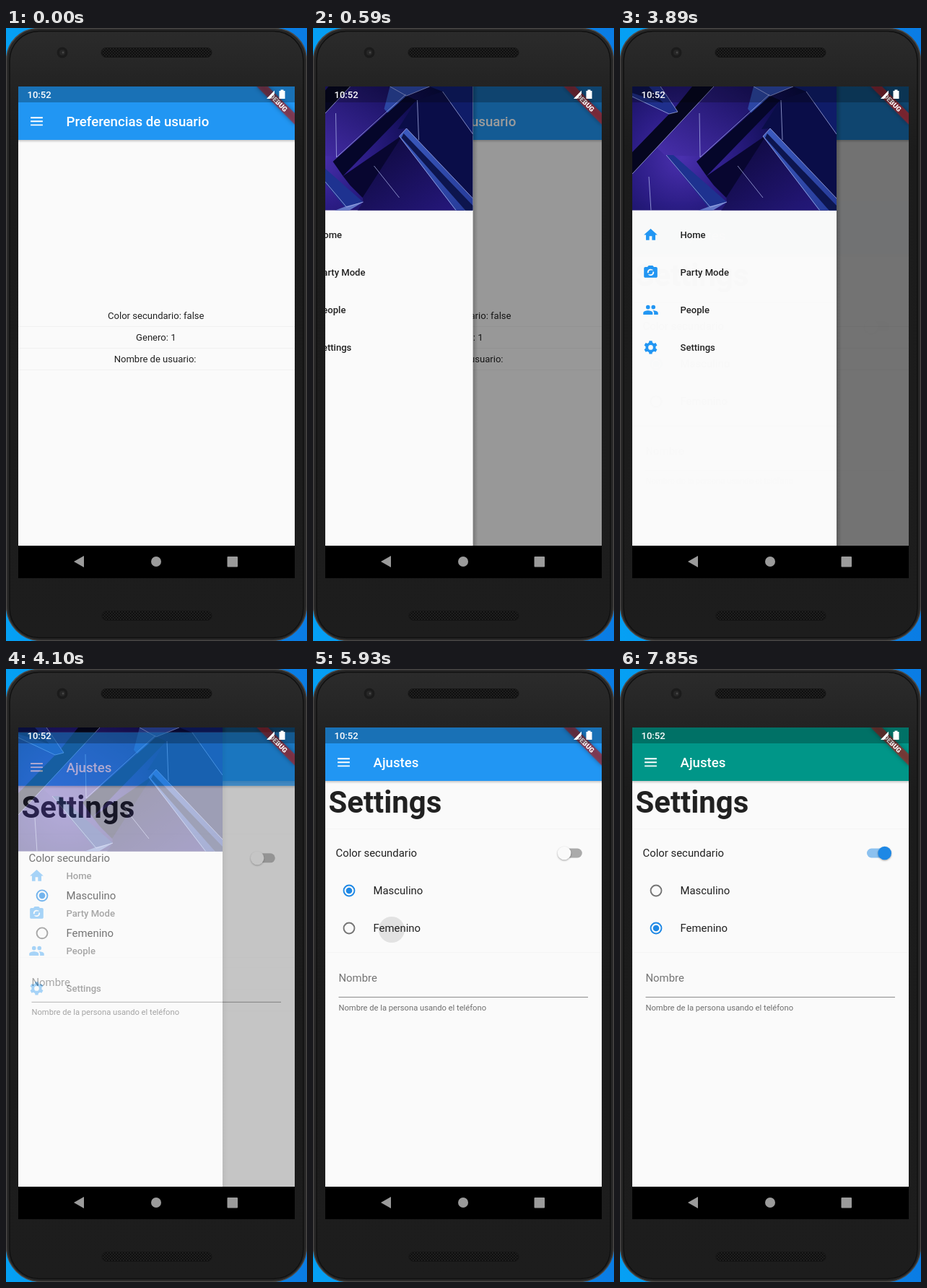
Animation, 417 px wide and 849 px high, one loop 8 s. Source, as an HTML page:

```html
<!DOCTYPE html>
<html lang="es">
<head>
<meta charset="utf-8">
<title>Preferencias de usuario</title>
<style>
  html, body { margin: 0; width: 100%; height: 100%; overflow: hidden; background: #0a86e8; }
  svg { display: block; }
  text { font-family: Roboto, "Noto Sans", sans-serif; font-size: 13.05px; fill: #212121; }
  .bar { font-size: 18.64px; font-weight: 500; fill: #fff; }
  .tile { font-weight: 500; }
  .big { font-size: 41.9px; font-weight: 700; }
  .row { font-size: 14.9px; }
  .help { font-size: 11.18px; fill: #6f6f6f; }
  .mid { text-anchor: middle; }
  .line { stroke: #000; stroke-opacity: .04; }
  #thumb { filter: drop-shadow(0 1px 1px rgba(0, 0, 0, .35)); }
  #ribbon { filter: drop-shadow(0 0 3px rgba(0, 0, 0, .5)); }
</style>
</head>
<body>
<svg width="417" height="849" viewBox="0 0 417 849">
  <defs>
    <linearGradient id="desk"><stop stop-color="#05a0f4"/><stop offset="1" stop-color="#0a7ce4"/></linearGradient>
    <linearGradient id="body" x2="0" y2="1">
      <stop stop-color="#2b2b2b"/><stop offset=".1" stop-color="#222"/>
      <stop offset=".2" stop-color="#1b1b1b"/><stop offset="1" stop-color="#1d1d1d"/>
    </linearGradient>
    <linearGradient id="fall" x2="0" y2="1"><stop stop-opacity=".2"/><stop offset="1" stop-opacity="0"/></linearGradient>
    <linearGradient id="side"><stop stop-opacity=".22"/><stop offset="1" stop-opacity="0"/></linearGradient>
    <radialGradient id="art" gradientUnits="userSpaceOnUse" cx="85" cy="180" r="190">
      <stop stop-color="#4a30ae"/><stop offset=".35" stop-color="#2c1d86"/>
      <stop offset=".7" stop-color="#130f58"/><stop offset="1" stop-color="#070a3c"/>
    </radialGradient>
    <linearGradient id="beam" x2="1" y2="1"><stop stop-color="#3c5cc0"/><stop offset="1" stop-color="#263a98"/></linearGradient>
    <linearGradient id="slab" x1="1" x2="0" y2="1"><stop stop-color="#150f5c"/><stop offset="1" stop-color="#4a30ae"/></linearGradient>
    <linearGradient id="floor" x2="1" y2="1"><stop stop-color="#0c0838"/><stop offset="1" stop-color="#26187e"/></linearGradient>
    <pattern id="mesh" width="4" height="4" patternUnits="userSpaceOnUse">
      <rect width="4" height="4" fill="#101010"/><path d="M0 0h1.400v1.400h-1.400zM2 2h1.400v1.400h-1.400z" fill="#2a2a2a"/>
    </pattern>
    <path id="menu" d="M34.1 124.200h16.800M34.1 129.300h16.800M34.1 134.400h16.800" stroke="#fff" stroke-width="1.900"/>
  </defs>

  <!-- phone -->
  <rect width="417" height="849" fill="url(#desk)"/>
  <path d="M.5 44A44 44 0 0 1 44 .5H373A44 44 0 0 1 416.500 44V800A48 48 0 0 1 368 848.500H49A48 48 0 0 1 .5 800Z"
    fill="#262626" stroke="#4c4a48" stroke-width="1.500"/>
  <rect x="5" y="4.500" width="407" height="840" rx="41" fill="url(#body)" stroke="#101010" stroke-width="1.500"/>
  <circle cx="78" cy="34" r="7.500" fill="#1b1b1b"/>
  <circle cx="78" cy="34" r="4" fill="#272727"/><circle cx="79" cy="34" r="1.400" fill="#484848"/>
  <rect x="132" y="27.500" width="153" height="13" rx="6.500" fill="url(#mesh)" stroke="#151515"/>
  <rect x="133" y="807.500" width="152" height="13" rx="6.500" fill="url(#mesh)" stroke="#151515"/>

  <!-- app -->
  <svg x="17" y="81" width="383" height="636" viewBox="17 81 383 636">
    <rect x="17" y="81" width="383" height="636" fill="#fafafa"/>
    <rect x="17" y="155" width="383" height="4" fill="url(#fall)"/>
    <rect x="17" y="81" width="383" height="74" fill="#2196f3"/>
    <use href="#menu"/>
    <text class="bar" x="83.500" y="136">Preferencias de usuario</text>
    <text class="mid" x="207.800" y="403">Color secundario: false</text>
    <text class="mid" x="207.800" y="433">Genero: 1</text>
    <text class="mid" x="206.600" y="463">Nombre de usuario:</text>
    <path class="line" d="M17 413.500h383M17 443.500h383M17 473.500h383"/>
    <rect id="scrim" x="17" y="81" width="383" height="636"/>

    <g id="drawer">
      <rect x="300" y="81" width="7" height="636" fill="url(#side)"/>
      <rect x="17" y="81" width="283" height="636" fill="#fafafa"/>
      <svg x="17" y="81" width="283" height="171.500" viewBox="17 81 283 171.500">
        <rect x="17" y="81" width="283" height="172" fill="url(#art)"/>
        <path d="M62 176L112 178L203 92L182 81H130L75 120L40 155Z" fill="url(#slab)"/>
        <path d="M100 81H130L17 202V172L75 112Z" fill="#05061f"/>
        <path d="M17 81H56L80 116L68 119L17 96Z" fill="#1f2f8c"/>
        <path d="M17 81H40L60 104L17 90Z" fill="#0c1250"/>
        <path d="M185 81H240L208 94L183 119L177 112Z" fill="#2c46a4"/>
        <path d="M208 94L222 100L120 205L106 185Z" fill="#05062a"/>
        <path d="M240 81H300V150L258 88Z" fill="#0f1c68"/>
        <path d="M222 100L258 88L300 147V236L208 139L196 140Z" fill="#0a0d48"/>
        <path d="M203 150L145 215L148 241L140 253H288Z" fill="url(#floor)"/>
        <path d="M203 148L147 235L130 218L120 205Z" fill="#080630"/>
        <path d="M198 150L208 139L300 236V253H276Z" fill="url(#beam)"/>
        <path d="M204 146L300 246V253H290L201 152Z" fill="#0d154e"/>
        <path d="M64 176L74 176L148 241L124 250Z" fill="#1e3290"/>
        <path d="M108 253L124 247L148 241L128 253Z" fill="#6478c8"/>
        <g fill="none" stroke="#b4bdf0" stroke-width=".9" opacity=".8">
          <path d="M17 95L68 119L80 116L56 81M130 81L17 202M207 92L111 179L110 118"/>
          <path d="M185 81L208 94L240 81M223 100L225 155M258 88L300 147M64 176L125 248L148 241"/>
          <path d="M40 206L43 253M163 191L198 235M198 150L208 139L300 236M198 150L277 253"/>
        </g>
      </svg>
      <g id="tiles" fill="#2196f3"></g>
    </g>

    <g id="page">
      <rect x="17" y="81" width="383" height="636" fill="#fafafa"/>
      <rect x="17" y="155" width="383" height="4" fill="url(#fall)"/>
      <rect id="appbar" x="17" y="81" width="383" height="74"/>
      <use href="#menu"/>
      <text class="bar" x="83.500" y="136">Ajustes</text>
      <text class="big" x="21.500" y="199">Settings</text>
      <path class="line" d="M17 221.500h383M17 392.500h383" opacity=".5"/>
      <text class="row" x="31.500" y="260">Color secundario</text>
      <rect id="track" x="342" y="248.500" width="30.800" height="13" rx="6.500"/>
      <circle id="thumb" cy="255" r="9.300"/>
      <svg x="17" y="333" width="383" height="52" viewBox="17 333 383 52">
        <circle id="ripple" cx="109" cy="361" fill="#c4c4c4"/>
      </svg>
      <g id="radios" fill="none" stroke-width="1.900"></g>
      <text class="row" x="83.500" y="312">Masculino</text>
      <text class="row" x="83.500" y="364">Femenino</text>
      <text class="row" x="35.500" y="432.500" style="fill:#757575">Nombre</text>
      <path d="M35.500 454.500H381" stroke="#8c8c8c"/>
      <text class="help" x="35.500" y="472.500">Nombre de la persona usando el teléfono</text>
    </g>

    <g transform="translate(400 81) rotate(45)">
      <rect id="ribbon" x="-37.300" y="26.100" width="74.600" height="11.200" fill="#b71c1c" fill-opacity=".63"/>
      <text class="mid" y="35.100" style="font-size:9.500px;font-weight:900;fill:#fff">DEBUG</text>
    </g>
  </svg>

  <!-- system bars -->
  <rect x="17" y="81" width="383" height="22" opacity=".25"/>
  <text class="tile" x="29.500" y="97" style="fill:#fff">10:52</text>
  <path d="M361 98L372 86.500V91L366 98ZM378.500 87H380.500V85.500H384.500V87H386.500V98H378.500Z" fill="#fff"/>
  <rect x="17" y="717" width="383" height="45"/>
  <g fill="#9b9b9b">
    <path d="M94 739L108 731V747Z"/><circle cx="208" cy="739" r="7"/>
    <rect x="306.500" y="732" width="14.500" height="14.500" rx="1"/>
  </g>
</svg>

<script>
const $ = id => document.getElementById(id);
const set = (el, attrs) => { for (const k in attrs) el.setAttribute(k, attrs[k]); };
const clamp = x => Math.min(1, Math.max(0, x));
const mix = (a, b, p) => `rgb(${a.map((v, i) => Math.round(v + (b[i] - v) * p))})`;

const teeth = [0, 60, 120, 180, 240, 300]
  .map(a => `<path d="M9.200 7L9.800 2.200h4.400L14.800 7z" transform="rotate(${a} 12 12)"/>`).join("");
const tiles = [
  ["Home", '<path d="M10 20v-6h4v6h5v-8h3L12 3 2 12h3v8z"/>'],
  ["Party Mode", `<path d="M20 4h-3.170L15 2H9L7.170 4H4c-1.100 0-2 .9-2 2v12c0 1.100.9 2 2 2h16c1.100 0 2-.9 2-2V6c0-1.100-.9-2-2-2z
    m-8 3c1.630 0 3.060.79 3.980 2H12c-1.660 0-3 1.340-3 3 0 .35.07.69.18 1H7.100c-.06-.32-.1-.66-.1-1 0-2.760 2.240-5 5-5z
    m0 10c-1.630 0-3.060-.79-3.980-2H12c1.660 0 3-1.340 3-3 0-.35-.07-.69-.18-1h2.080c.07.32.1.66.1 1 0 2.760-2.240 5-5 5z"/>`],
  ["People", `<circle cx="8" cy="8" r="3"/><circle cx="16" cy="8" r="3"/>
    <path d="M8 13c-2.330 0-7 1.170-7 3.500V19h14v-2.500c0-2.330-4.670-3.500-7-3.500z
    m8 0c-.29 0-.62.02-.97.05 1.160.84 1.970 1.970 1.970 3.450V19h6v-2.500c0-2.330-4.670-3.500-7-3.500z"/>`],
  ["Settings", `<circle cx="12" cy="12" r="5.600" fill="none" stroke="#2196f3" stroke-width="4"/>${teeth}`]
];
$("tiles").innerHTML = tiles.map(([name, icon], i) =>
  `<g transform="translate(31.300 ${275.2 + 52 * i}) scale(.932)">${icon}</g>
   <text class="tile" x="83.500" y="${291 + 52 * i}">${name}</text>`).join("");
$("radios").innerHTML = [307, 359].map(y =>
  `<g><circle cx="50" cy="${y}" r="7.460"/><circle cx="50" cy="${y}" stroke="none"/></g>`).join("");

// CSS-style cubic bezier, solved by bisection
function bezier(x1, y1, x2, y2) {
  const at = (a, b, s) => 3 * a * s * (1 - s) ** 2 + 3 * b * s * s * (1 - s) + s ** 3;
  return x => {
    let lo = 0, hi = 1;
    for (let i = 0; i < 24; i++) {
      const m = (lo + hi) / 2;
      if (at(x1, x2, m) < x) lo = m; else hi = m;
    }
    return at(y1, y2, lo);
  };
}
const easeIn = bezier(.42, 0, 1, 1);
const fastOutSlowIn = bezier(.4, 0, .2, 1);

// Critically damped spring with an initial speed of 1
const spring = s => 1 - (1 + 21.36 * s) * Math.exp(-22.36 * s);

const BLUE = [30, 136, 229], GREY = [117, 117, 117];

function drawRadio(g, on) {
  const color = mix(GREY, BLUE, on);
  set(g.children[0], { stroke: color });
  set(g.children[1], { fill: color, r: 4.3 * on });
}

function draw(time) {
  const t = Math.floor((time - 20) / 30) * 30 + 20;  // the screen refreshes every 30 ms

  const open = t < 500 ? 0 : t >= 770 ? 1 : spring((t - 478) / 1000);
  set($("scrim"), { opacity: .54 * open });
  set($("drawer"), { transform: `translate(${-283 * (1 - open)})`, visibility: open ? "visible" : "hidden" });

  const enter = t >= 4160 ? 1 : clamp((t - 3877) / 300);
  set($("page"), {
    transform: `translate(0 ${159 * (1 - fastOutSlowIn(enter))})`,
    opacity: enter < 1 ? easeIn(enter) : 1,
    visibility: enter ? "visible" : "hidden"
  });

  const spread = (t - 5930) / 150;
  set($("ripple"), { r: Math.max(0, 18 + 46 * spread), opacity: t < 5930 ? 0 : .45 * clamp((6110 - t) / 150) });
  const pick = clamp((t - 5950) / 160);
  const [first, second] = $("radios").children;
  drawRadio(first, 1 - pick);
  drawRadio(second, pick);

  const flip = easeIn(clamp((t - 7630) / 210));
  set($("appbar"), { fill: t < 7640 ? "#2196f3" : "#009688" });
  set($("track"), { fill: mix([170, 170, 170], [140, 193, 239], flip) });
  set($("thumb"), { cx: 348.1 + 18.6 * flip, fill: mix([250, 250, 250], BLUE, flip) });
}

const start = performance.now();
function tick() {
  draw((performance.now() - start) % 8000);
  requestAnimationFrame(tick);
}
tick();
</script>
</body>
</html>
```
